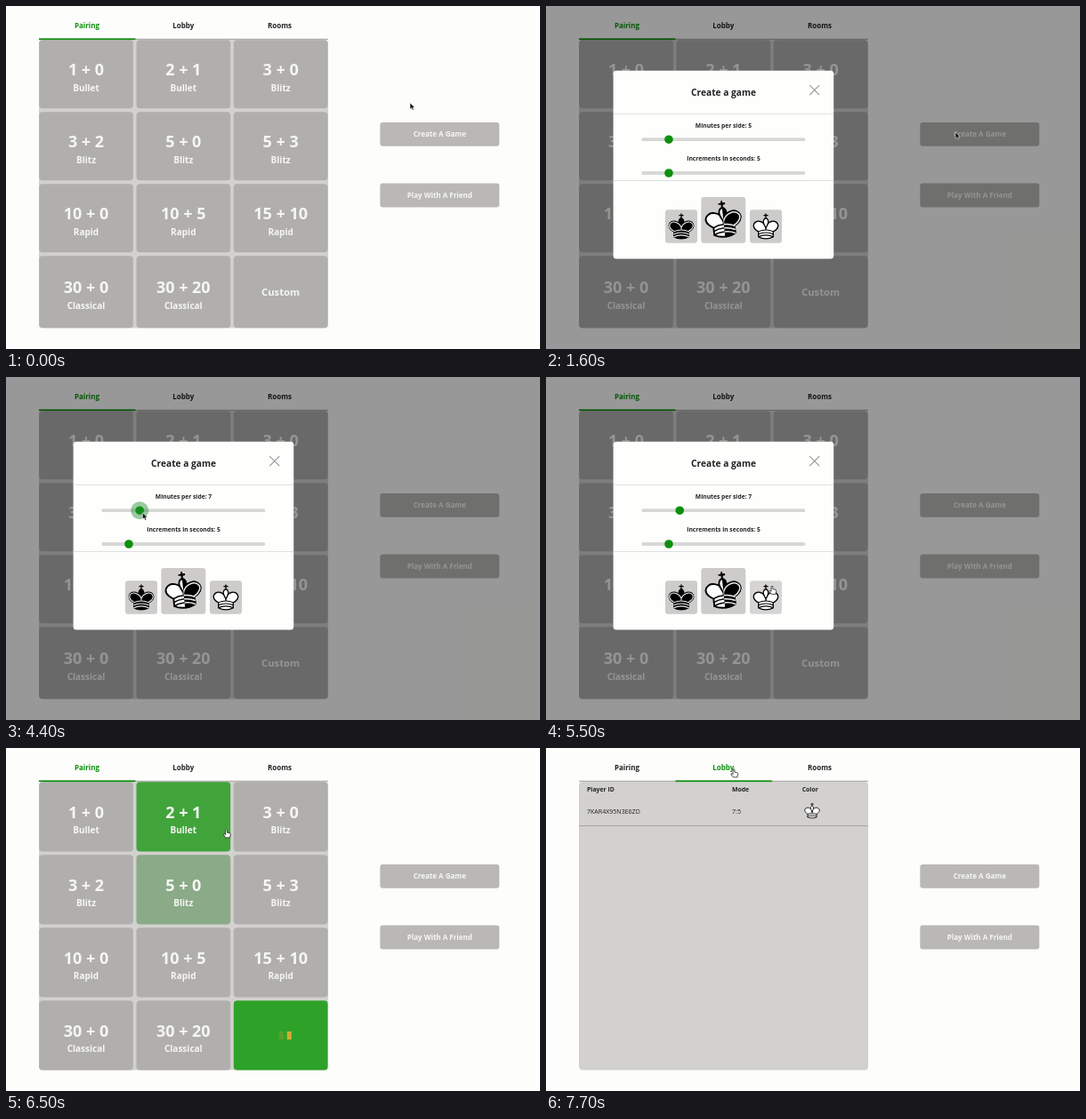
Animation, 600 px wide and 386 px high, one loop 7900 ms. Source, as an HTML page:

```html
<!DOCTYPE html>
<html lang="en">
<head>
<meta charset="utf-8">
<title>Game pairing</title>
<style>
  html, body { margin: 0; width: 100%; height: 100%; overflow: hidden; background: #fdfdfc; }
  svg { display: block; width: 600px; height: 386px; }
  text { font-family: "Open Sans", "Noto Sans", sans-serif; font-weight: 700; fill: #222; }
  .light { fill: #f6f6f4; }
  .mid { text-anchor: middle; }
  .plain { font-weight: 400; }
</style>
</head>
<body>
<svg id="stage" viewBox="0 0 600 386" xmlns="http://www.w3.org/2000/svg"></svg>
<script>
const LOOP = 7900, STEP = 100;
const MODAL_IN = 1600, MODAL_OUT = 5700, TAB_CLICK = 7200, LOBBY_IN = 7300;
const GREY = [176, 175, 174], BUTTON_GREY = [185, 184, 182], GREEN = [46, 162, 40];
const ACCENT = '#0c900c', PANEL = '#d2d1cf';
const stage = document.getElementById('stage');

function add(parent, tag, attrs = {}, content) {
  const el = document.createElementNS('http://www.w3.org/2000/svg', tag);
  set(el, attrs);
  if (content !== undefined) el.textContent = content;
  parent.append(el);
  return el;
}
function set(el, attrs) {
  for (const key in attrs) el.setAttribute(key, attrs[key]);
}
const group = (parent = stage) => add(parent, 'g');
const box = (parent, x, y, width, height, fill, rx = 0) =>
  add(parent, 'rect', { x, y, width, height, fill, rx });
const label = (parent, x, y, size, content, cls = 'mid') =>
  add(parent, 'text', { x, y, 'font-size': size, class: cls }, content);
const line = (parent, d, stroke, width) =>
  add(parent, 'path', { d, stroke, 'stroke-width': width, fill: 'none' });
const show = (el, on) => el.setAttribute('display', on ? 'inline' : 'none');
const mix = (a, b, k) => `rgb(${a.map((v, i) => Math.round(v + (b[i] - v) * k))})`;

// Chess king in a 45-unit square
const KING = {
  cross: 'M22.5 11.6V6M20 8h5',
  gem: 'M22.5 25s4.5-7.5 3-10.5c0 0-1-2.5-3-2.5s-3 2.5-3 2.5c-1.5 3 3 10.5 3 10.5z',
  body: 'M12.5 37c5.5 3.5 14.5 3.5 20 0v-7s9-4.5 6-10.5c-4-6.5-13.5-3.5-16 4V27v-3.5c-2.5-7.5-12-10.5-16-4-3 6 6 10.5 6 10.5z',
  bands: 'M12.5 30c5.5-3 14.5-3 20 0m-20 3.5c5.5-3 14.5-3 20 0m-20 3.5c5.5-3 14.5-3 20 0',
  lobes: 'M32 29.5s8.5-4 6-9.7C34.1 14 25 18 22.5 24.6v2.1-2.1C20 18 10.9 14 7 19.8c-2.5 5.7 4.9 9 4.9 9'
};
function kingSide(parent, dark) {
  const g = add(parent, 'g', {
    fill: dark ? '#000' : '#fff', stroke: '#000', 'stroke-width': 1.6,
    'stroke-linejoin': 'round', 'stroke-linecap': 'round'
  });
  add(g, 'path', { d: KING.body });
  add(g, 'path', { d: KING.gem });
  add(g, 'path', { d: KING.cross, fill: 'none' });
  const trim = { fill: 'none', stroke: dark ? '#eee' : '#000', 'stroke-width': 1.3 };
  add(g, 'path', { d: KING.bands, ...trim });
  if (dark) add(g, 'path', { d: KING.lobes, ...trim });
  return g;
}
function king(parent, cx, top, scale, kind, tilt = 0) {
  const g = add(parent, 'g', {
    transform: `translate(${cx - 22.5 * scale} ${top}) scale(${scale}) rotate(${tilt} 22.5 24)`
  });
  if (kind !== 'mixed') return kingSide(g, kind === 'black');
  kingSide(g, false);
  add(kingSide(g, true), 'title');
  g.lastChild.setAttribute('clip-path', 'url(#right)');
}
const clip = add(add(stage, 'defs'), 'clipPath', { id: 'right' });
box(clip, 22.5, 0, 23, 45, '#000');

// Page
box(stage, 0, 0, 600, 386, '#fdfdfc');
box(stage, 37, 38, 325, 324.5, PANEL, 4);

const tabs = ['Pairing', 'Lobby', 'Rooms'].map((name, i) => label(stage, 91 + i * 108.3, 24.5, 8, name));

const grid = group();
const modes = [
  ['1 + 0', 'Bullet'], ['2 + 1', 'Bullet'], ['3 + 0', 'Blitz'],
  ['3 + 2', 'Blitz'], ['5 + 0', 'Blitz'], ['5 + 3', 'Blitz'],
  ['10 + 0', 'Rapid'], ['10 + 5', 'Rapid'], ['15 + 10', 'Rapid'],
  ['30 + 0', 'Classical'], ['30 + 20', 'Classical'], ['Custom']
];
const cards = modes.map(([title, kind], i) => {
  const x = 37.2 + (i % 3) * 109.3, cx = x + 52.8;
  return {
    x, row: Math.floor(i / 3), custom: !kind,
    rect: box(grid, x, 0, 105.7, 78, '#b0afae', 4),
    title: label(grid, cx, 0, kind ? 18 : 11.3, title, 'mid light'),
    kind: label(grid, cx, 0, 10, kind || '', 'mid light')
  };
});
const bars = [box(grid, 307, 319, 5, 9, '#a39429'), box(grid, 315.7, 319, 5, 9, '#dfab33')];

const lobby = group();
[['Player ID', 46], ['Mode', 209], ['Color', 287.7]].forEach(([name, x]) => label(lobby, x, 49, 6.9, name, ''));
label(lobby, 46, 74.2, 7.05, '7KAR4X95N3E6ZD', 'plain');
label(lobby, 209, 74.2, 7.05, '7:5', 'plain');
king(lobby, 299, 59.2, 0.5, 'white');
line(lobby, 'M37 87.6H362', '#a09f9e', 0.9);

line(stage, 'M37 37.3H362', '#a29b9a', 1);
const marker = box(stage, 37, 36.4, 108.4, 1.7, ACCENT);

const buttons = [['Create A Game', 131], ['Play With A Friend', 199.6]].map(([name, y]) => {
  const rect = box(stage, 420.3, y, 134, 26.8, mix(BUTTON_GREY, GREEN, 0), 3);
  label(stage, 487.3, y + 16.4, 8, name, 'mid light');
  return { rect, y };
});

// Dialog
const modal = group();
box(modal, 0, 0, 600, 386, 'rgba(0,0,0,.4)');
box(modal, 75.6, 72.7, 247.6, 211.9, '#fefefd', 3.5);
label(modal, 199.5, 100.8, 10.2, 'Create a game');
line(modal, 'M296.2 89.2l11 11m0-11l-11 11', '#959595', 1.1);
line(modal, 'M75.6 121.4H323.2M75.6 196.5H323.2', '#dcdcdb', 0.9);

const sliderX = value => 107.3 + 184 * value / 30;
const minutesLabel = label(modal, 199.5, 136.8, 6.72, '');
label(modal, 199.5, 174.4, 6.72, 'Increments in seconds: 5');
const [minutesThumb] = [150.2, 188].map(cy => {
  box(modal, 107.3, cy - 1.9, 184, 3.8, '#d7d7d6', 1.9);
  return add(modal, 'circle', { cx: sliderX(5), cy, r: 4.8, fill: ACCENT });
});
const halo = add(modal, 'circle', { cy: 150.2, fill: 'rgba(30,140,45,.45)' });

box(modal, 134, 229.3, 36, 37.4, '#cdcccb', 3);
box(modal, 174.3, 215, 50, 51.7, '#cdcccb', 3);
const whiteTile = box(modal, 229, 229.3, 36, 37.4, '#cdcccb', 3);
king(modal, 152, 229, 0.83, 'black');
king(modal, 199.3, 213, 1.18, 'mixed', -6);
king(modal, 247, 229, 0.83, 'white');

// Pointer
const arrow = add(stage, 'path', {
  d: 'M0 0V7.2L1.7 5.7L2.9 8.3L4.2 7.7L3.1 5.2H5.3Z',
  fill: '#111', stroke: '#fff', 'stroke-width': 0.5
});
const hand = add(stage, 'path', {
  d: 'M-.9 .7Q0-.5 .9 .7V3.6L4.2 4.4Q5 4.8 4.7 6.2L4 9.4H-.7L-3 6.3Q-3.2 5-1.9 5.3L-.9 6.2Z',
  fill: '#fff', stroke: '#222', 'stroke-width': 0.8, 'stroke-linejoin': 'round'
});

// time, x, y
const path = [
  [100, 454, 109], [900, 460, 142], [1800, 460, 142], [2600, 150, 152],
  [3000, 138, 146], [3400, 138, 146], [4200, 147.5, 148], [4300, 147.5, 148],
  [5000, 255, 236], [5200, 255, 236], [5500, 254, 235], [5600, 253, 237.5],
  [5700, 253, 237.5], [6400, 247.5, 91.5], [6500, 247.5, 91.5], [7200, 211, 23.5], [7900, 211, 23.5]
];
const smooth = k => k * k * (3 - 2 * k);
function pointerAt(t) {
  const i = path.findIndex(p => p[0] > t);
  if (i <= 0) return i ? path[path.length - 1].slice(1) : path[0].slice(1);
  const [t0, x0, y0] = path[i - 1], [t1, x1, y1] = path[i];
  const k = smooth((t - t0) / (t1 - t0));
  return [x0 + (x1 - x0) * k, y0 + (y1 - y0) * k];
}

const modalAt = t => t >= MODAL_IN && t < MODAL_OUT;
const inside = ([px, py], x, y, w, h) => px >= x && px <= x + w && py >= y && py <= y + h;

// Hover fades in and out over a few steps
function hover(t, x, y, w, h) {
  if (modalAt(t)) return 0;
  let hits = 0;
  for (let i = 0; i < 4; i++) {
    const past = t - i * STEP;
    if (!modalAt(past) && inside(pointerAt(past), x, y, w, h)) hits++;
  }
  return Math.min(1, hits / 3.5);
}

function drawGrid(t) {
  const waiting = t >= MODAL_OUT;
  const pitch = waiting ? 82 : 81;
  for (const c of cards) {
    const y = 38.2 + c.row * pitch;
    const h = waiting ? 78.3 : c.row === 3 ? 81 : 77;
    const mid = y + h / 2;
    const k = c.custom && waiting ? 1 : hover(t, c.x, y, 105.7, h);
    set(c.rect, { y, height: h, fill: mix(GREY, GREEN, k) });
    c.title.setAttribute('y', c.custom ? mid + 4.4 : mid + 1.4);
    c.kind.setAttribute('y', mid + 18.9);
    if (c.custom) show(c.title, !waiting);
  }
  bars.forEach((bar, i) => {
    show(bar, t >= 6000);
    bar.setAttribute('opacity', 0.65 + 0.3 * Math.cos((t - 6500) / 160 - (i ? 0 : 2.4)));
  });
}

function drawModal(t) {
  const minutes = t < 3700 ? 5 : t < 4000 ? 6 : 7;
  const cx = sliderX(minutes);
  minutesLabel.textContent = 'Minutes per side: ' + minutes;
  minutesThumb.setAttribute('cx', cx);
  set(halo, { cx, r: t >= 3500 ? 10 : 7 });
  show(halo, t >= 2600 && t < 4600);
  whiteTile.setAttribute('fill', t >= 5000 ? '#d6d5d4' : '#cdcccb');
}

function drawPointer(t) {
  const p = pointerAt(t);
  const pointing = modalAt(t)
    ? inside(p, 229, 229, 36, 38)
    : inside(p, 420, 131, 134, 27) || inside(p, 37, 10, 325, 27) ||
      (t > MODAL_OUT && p[0] < 252.5 && t < LOBBY_IN);
  show(hand, pointing);
  show(arrow, !pointing);
  (pointing ? hand : arrow).setAttribute('transform', `translate(${p[0]} ${p[1]})`);
}

function draw(now) {
  const t = Math.floor(now % LOOP / STEP) * STEP;
  const active = t >= TAB_CLICK ? 1 : 0;
  const slide = smooth(Math.min(1, Math.max(0, (t - TAB_CLICK) / 200)));
  tabs.forEach((tab, i) => { tab.style.fill = i === active ? ACCENT : '#222'; });
  marker.setAttribute('x', 37 + 108.4 * slide);
  show(grid, t < LOBBY_IN);
  show(lobby, t >= LOBBY_IN);
  show(modal, modalAt(t));
  for (const b of buttons) b.rect.setAttribute('fill', mix(BUTTON_GREY, GREEN, hover(t, 420.3, b.y, 134, 26.8)));
  drawGrid(t);
  drawModal(t);
  drawPointer(t);
}

function tick() {
  draw(performance.now());
  requestAnimationFrame(tick);
}
tick();
</script>
</body>
</html>
```
